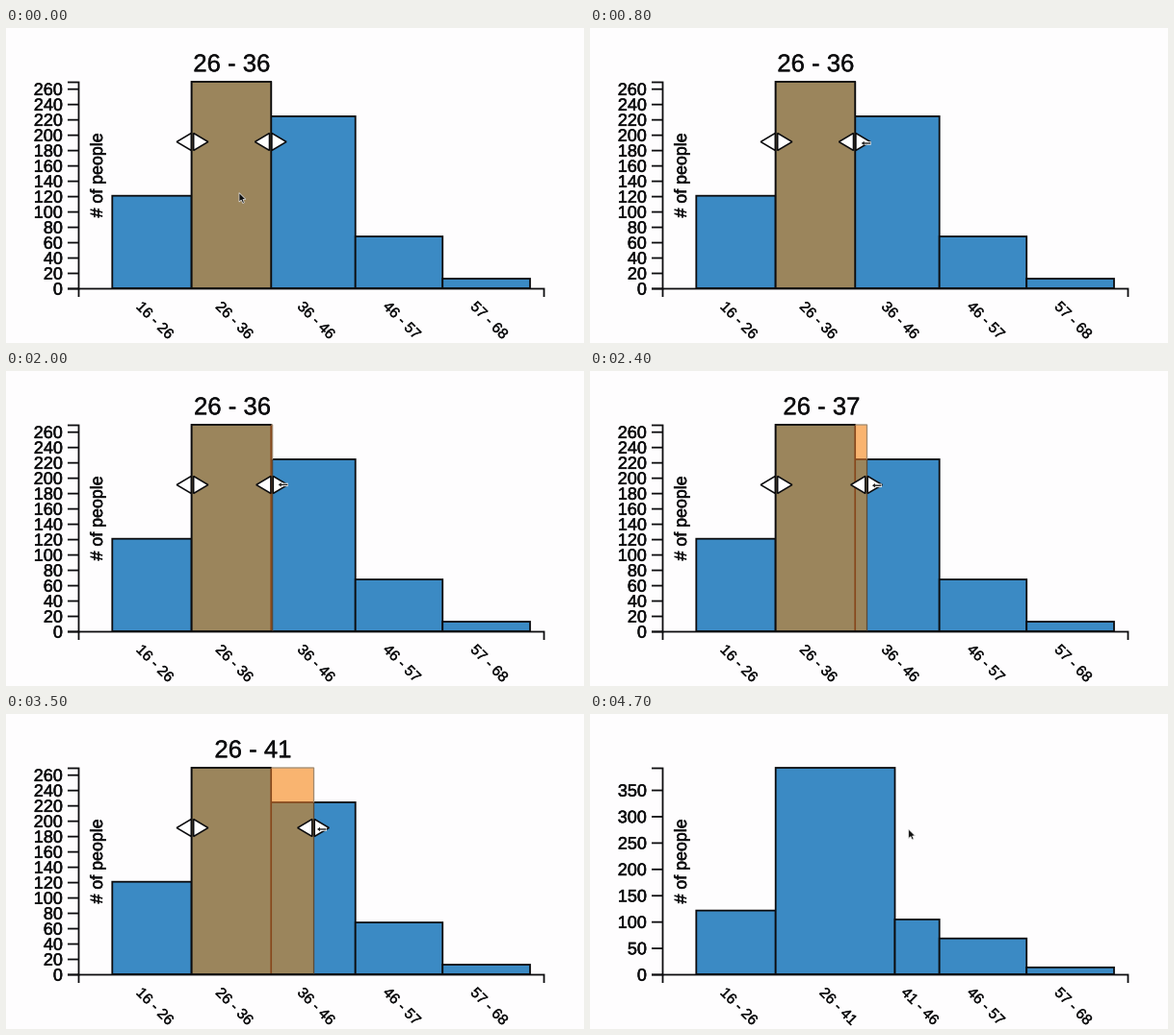
Recreate the animation shown at these times as a matplotlib script. Size 600x328 px, loop 4.8 s.

```python
import matplotlib.pyplot as plt
from matplotlib.animation import FuncAnimation
from matplotlib.patches import Polygon, Rectangle
from matplotlib.patheffects import withStroke
import numpy as np

W, H, DPI = 600, 328, 100
FRAMES, STEP = 48, 100
PX = 72 / DPI

INK, PAPER = "#0c0c0e", "#fefdfe"
BLUE, BROWN, ORANGE, RUST = "#3b8ac4", "#9b855c", "#f9b470", "#87481c"
TOP, BASE = 56, 271
LEFT, RIGHT = 75.5, 558.5
YEAR = 8.27                      # pixels per year of age
GRIP_Y = 118.5

BEFORE = dict(edges=[110.3, 192.7, 275.2, 362.7, 453.2, 544],
              counts=[120.5, 269, 224, 67.5, 12.5], step=20,
              names=["16 - 26", "26 - 36", "36 - 46", "46 - 57", "57 - 68"])
AFTER = dict(edges=[110.3, 192.7, 316.5, 362.7, 453.2, 544],
             counts=[121, 392, 104, 68, 13], step=50,
             names=["16 - 26", "26 - 41", "41 - 46", "46 - 57", "57 - 68"])
HOVER, DROP, REBIN = 700, 4200, 4500

plt.rcParams["font.family"] = "Liberation Sans"
plt.rcParams["path.snap"] = False
fig = plt.figure(figsize=(W / DPI, H / DPI), dpi=DPI, facecolor=PAPER)
ax = fig.add_axes([0, 0, 1, 1])


def line(xs, ys, color=INK, width=1.8, z=3):
    ax.plot(xs, ys, color=color, lw=width * PX, zorder=z,
            solid_capstyle="butt", solid_joinstyle="miter")


def box(x0, x1, y0, y1, fill, z, edge="none", width=0):
    ax.add_patch(Rectangle((x0, y0), x1 - x0, y1 - y0, fc=fill, ec=edge,
                           lw=width * PX, zorder=z))


def shape(points, fill, edge, width, z):
    ax.add_patch(Polygon(points, closed=True, fc=fill, ec=edge, lw=width * PX,
                         joinstyle="miter", zorder=z))


def text(x, y, s, size, ha="center", angle=0, bold=0.3):
    ax.text(x, y, s, size=size * PX, ha=ha, va="baseline", color=INK,
            rotation=angle, rotation_mode="anchor", zorder=6,
            path_effects=[withStroke(linewidth=bold * PX, foreground=INK)])


def draw_axes(chart):
    scale = (BASE - TOP) / max(chart["counts"])
    line([64, LEFT, LEFT, 64], [TOP + 0.5, TOP + 0.5, BASE + 0.5, BASE + 0.5])
    line([LEFT, LEFT, RIGHT, RIGHT], [280, BASE + 0.5, BASE + 0.5, 280])
    for v in range(0, max(chart["counts"]) + 1, chart["step"]):
        y = BASE + 0.5 - v * scale
        line([64, LEFT], [y, y])
        text(59, y + 6.2, str(v), 18, "right", bold=0.5)
    text(100, 197.5, "# of people", 17.8, "left", 90, bold=0.5)


def draw_bars(chart):
    edges, counts = chart["edges"], chart["counts"]
    scale = (BASE - TOP) / max(counts)
    for x0, x1, n, name in zip(edges, edges[1:], counts, chart["names"]):
        box(x0, x1, BASE - n * scale, BASE, BLUE, 2, INK, 1.8)
        text((x0 + x1) / 2 - 0.4, 307.7, name, 15.4, angle=-45)


def draw_grip(x):
    for side in (-1, 1):
        shape([(x + side * 16.3, GRIP_Y), (x + side * 1.2, GRIP_Y - 9),
               (x + side * 1.2, GRIP_Y + 9)], "white", INK, 1.6, 8)


def draw_selection(x):
    x0, x1 = BEFORE["edges"][1:3]
    bar_top = BASE - BEFORE["counts"][2] * (BASE - TOP) / 269
    box(x0, x1, TOP, BASE, BROWN, 4)
    if x > x1 + 0.5:
        box(x1, x, TOP, bar_top, ORANGE, 4)
        box(x1, x, bar_top, BASE, BROWN, 4)
        line([x1, x], [bar_top, bar_top], RUST, 1.7, 5)
        line([x1, x1], [TOP, BASE], RUST, 1.7, 5)
        line([x1, x, x], [TOP, TOP, bar_top], "#a08a70", 1.3, 5)
        line([x, x], [bar_top, BASE], "#5a4a38", 1.3, 5)
    else:
        line([x1, x1], [TOP, BASE], INK, 1.8, 5)
    line([x0, x0, x1], [BASE, TOP, TOP], INK, 1.8, 5)
    line([x0, x], [BASE, BASE], INK, 1.8, 5)
    age = int(26 + (x - x0) / YEAR + 0.05)
    text((x0 + x) / 2 + 0.3, 45.3, f"26 - {age}", 25.7)
    draw_grip(x0 + 0.8)
    draw_grip(x - 0.5)


def draw_arrow(x, y):
    outline = np.array([(0, 0), (0, 9.6), (2.2, 7.6), (3.8, 11), (5.4, 10.2),
                        (3.9, 7), (6.8, 6.8)])
    shape(outline + (x, y), "#101010", "#e8e8e8", 0.7, 10)


def draw_resizer(x, y):
    line([x - 5.5, x + 5], [y, y], "white", 3.4, 9)
    line([x - 3.5, x + 4.5], [y, y], "#222222", 1.4, 10)
    shape([(x - 5, y), (x - 2, y - 2.2), (x - 2, y + 2.2)],
          "#222222", "none", 0, 10)


def draw_pointer(t, x):
    if t < HOVER:
        p = np.clip((t - 50) / (HOVER - 50), 0, 1)
        p = p * p * (3 - 2 * p)
        draw_arrow(242 + 42 * p, 171.5 - 54 * p)
    elif t < DROP:
        offset = np.interp(t, [1800, 3500], [11.5, 8.5])
        draw_resizer(x + offset, np.interp(t, [800, 1800, 2800], [120, 118, 120]))
    else:
        draw_arrow(330.7, np.interp(t, [4300, 4600], [119, 120]))


def draw(i):
    t = i * STEP
    x = np.interp(t, [1700, 2000, 2400, 2900, 3500, 4000],
                  [275.2, 276.6, 287.5, 305, 319.5, 321])
    ax.clear()
    ax.set(xlim=(0, W), ylim=(H, 0))
    ax.axis("off")
    chart = BEFORE if t < REBIN else AFTER
    draw_axes(chart)
    draw_bars(chart)
    if chart is BEFORE:
        draw_selection(x)
    draw_pointer(t, x)
    return []


anim = FuncAnimation(fig, draw, frames=FRAMES, interval=STEP,
                     repeat=True, repeat_delay=0, init_func=lambda: [])
plt.show()
```
